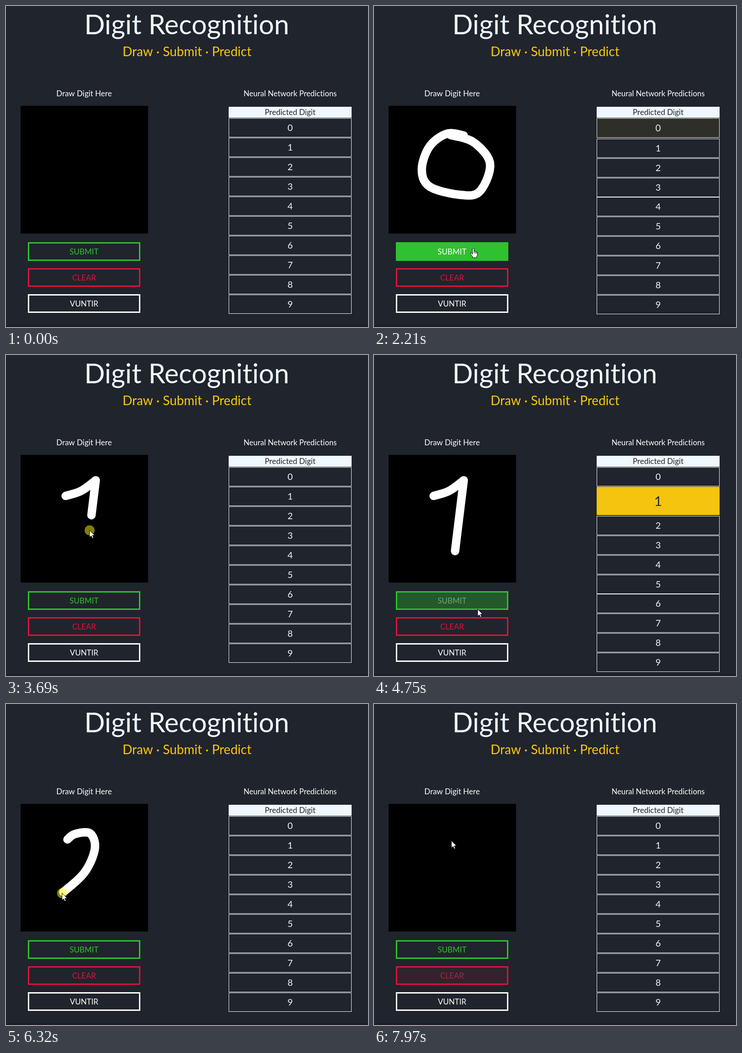
An HTML page with a canvas for the animation above (8000 ms loop, 795x704 px).

```html
<!DOCTYPE html>
<html lang="en">
<head>
<meta charset="utf-8">
<title>Digit Recognition</title>
<style>
html, body { margin: 0; width: 100%; height: 100%; overflow: hidden; background: #20242c; }
canvas { display: block; width: 795px; height: 704px; }
</style>
</head>
<body>
<canvas id="stage" width="795" height="704"></canvas>
<script>
const ctx = document.getElementById('stage').getContext('2d');
const LOOP = 8000;
const BG = [32, 36, 44], WHITE = [255, 255, 255], ICE = [240, 248, 255];
const GOLD = [250, 200, 15], GREEN = [47, 193, 47], RED = [220, 20, 60];

const clamp = v => Math.max(0, Math.min(1, v));
const smooth = v => { v = clamp(v); return v * v * (3 - 2 * v); };
const lerp = (a, b, k) => a + (b - a) * k;
const mix = (a, b, k) => a.map((v, i) => lerp(v, b[i], k));
const rgb = (c, a = 1) => `rgba(${c.map(Math.round).join()},${a})`;

const ENTER = 340, TAP = 60;
const SUBMIT_SPOT = [218, 531];

// One round per digit: pen strokes, then a tap on SUBMIT and one on CLEAR.
const rounds = [
  {
    pen: [{ from: 900, to: 1560, pts: [[197, 284], [160, 280], [122, 308], [105, 358], [122, 396],
      [188, 414], [232, 407], [255, 346], [219, 299], [168, 283]] }],
    submit: 2120, clear: 2850, clearSpot: [224, 602]
  },
  {
    pen: [
      { from: 3470, to: 3576, pts: [[131, 309], [165, 298], [197, 275]] },
      { from: 3576, to: 3748, pts: [[197, 275], [178, 430]] }
    ],
    submit: 4510, clear: 5320, clearSpot: [238, 586]
  },
  {
    pen: [
      { from: 5800, to: 6300, pts: [[135, 297], [152, 285], [185, 284], [195, 318], [172, 370], [123, 415]] },
      { from: 6390, to: 6570, pts: [[123, 415], [214, 414]] }
    ],
    submit: 6960, clear: 7710, clearSpot: [238, 588]
  }
];

// Smooth curve through the points, equal time for each span.
function curve(pts, k) {
  const n = pts.length - 1;
  const i = Math.min(n - 1, Math.floor(clamp(k) * n));
  const u = clamp(k) * n - i;
  const at = j => pts[Math.max(0, Math.min(n, j))];
  return [0, 1].map(d => {
    const [a, b, c, e] = [-1, 0, 1, 2].map(j => at(i + j)[d]);
    return b + u / 2 * (c - a + u * (2 * a - 5 * b + 4 * c - e + u * (3 * (b - c) + e - a)));
  });
}

// Pointer track: travel to the digit, draw, travel to each button in turn.
const track = [];
const travel = (from, to, goal) => track.push({ from, to, goal });
let free = ENTER;
for (const r of rounds) {
  travel(free, r.pen[0].from, r.pen[0].pts[0]);
  track.push(...r.pen);
  const done = r.pen[r.pen.length - 1].to;
  travel(done, lerp(done, r.submit, 0.8), SUBMIT_SPOT);
  travel(r.submit + 90, r.submit + 400, r.clearSpot);
  free = r.clear + 70;
}
travel(free, LOOP - 30, [170, 300]);

function pointerAt(t) {
  let p = [601, 678];
  for (const s of track) {
    if (t < s.from) break;
    const k = (t - s.from) / (s.to - s.from);
    p = s.pts ? curve(s.pts, k) : mix(p, s.goal, smooth(k));
  }
  return p;
}

const pressed = t => rounds.some(r =>
  (t >= r.pen[0].from && t < r.pen[r.pen.length - 1].to + 20) ||
  [r.submit, r.clear].some(tap => t >= tap && t < tap + TAP));

const buttons = [
  { label: 'SUBMIT', color: GREEN, hover: rounds.map(r => [r.submit - 150, r.submit + 150]) },
  { label: 'CLEAR', color: RED, hover: rounds.map(r => [r.clear - 460, r.clear + 98]) },
  { label: 'VUNTIR', color: WHITE, hover: [] }
];
const hovered = (b, t) => b.hover.some(([on, off]) => t >= on && t < off);

function text(str, x, y, size, color) {
  ctx.font = `${size}px Lato, "Open Sans", sans-serif`;
  ctx.fillStyle = color;
  ctx.fillText(str, x, y);
}

function box(x, y, w, h, color) {
  ctx.fillStyle = color;
  ctx.fillRect(x, y, w, h);
}

function frame(x, y, w, h, line, color) {
  ctx.lineWidth = line;
  ctx.strokeStyle = color;
  ctx.strokeRect(x + line / 2, y + line / 2, w - line, h - line);
}

function drawPad(t) {
  box(32, 219, 280, 280, '#000');
  ctx.lineWidth = 18.5;
  ctx.lineCap = ctx.lineJoin = 'round';
  ctx.strokeStyle = '#fff';
  const ink = t - 30;
  for (const r of rounds) {
    if (t >= r.clear + TAP) continue;
    for (const s of r.pen) {
      if (ink <= s.from) continue;
      const end = clamp((ink - s.from) / (s.to - s.from));
      ctx.beginPath();
      for (let i = 0; i <= 60; i++) ctx.lineTo(...curve(s.pts, end * i / 60));
      ctx.stroke();
    }
  }
  ctx.lineJoin = 'miter';
}

function drawTable(t) {
  box(489, 221, 270, 24, rgb(ICE));
  text('Predicted Digit', 624, 239, 17, rgb(BG));
  let shift = 0;
  for (let i = 0; i < 10; i++) {
    const r = rounds[i];
    const k = r ? smooth((t - r.submit - TAP) / 200) - smooth((t - r.clear - TAP) / 200) : 0;
    const y = Math.round(246.3 + 42.95 * i + shift);
    const h = Math.round(42 + 21 * k);
    if (k > 0) box(489, y, 270, h, rgb(GOLD, k));
    frame(489, y, 270, h, 1, rgb(mix(ICE, GOLD, clamp(k * 2))));
    const size = 20 + 10 * k;
    text(i, 624, y + h / 2 + size * 0.36, size, rgb(mix(ICE, BG, k)));
    shift += 21 * k;
  }
}

function drawButton(b, i, t) {
  const y = 518 + 57 * i;
  let fill = 0, tint = 1;
  for (const [on, off] of b.hover) {
    if (t >= on && t < off) {
      fill = smooth((t - on) / 120);
      tint = 1 - fill;
    } else if (t >= off && t < off + 300) {
      tint = (t - off) / 300;
      fill = (1 - tint) ** 3;
    }
  }
  box(48, y, 247, 41, rgb(b.color, fill));
  frame(48, y, 247, 41, 3, rgb(b.color));
  text(b.label, 171.5, y + 26.5, 17, rgb(b.color, tint));
  text(b.label, 171.5, y + 26.5, 17, rgb(WHITE, fill));
}

const ARROW = new Path2D('M0 0V15.5L3.6 12.2 6 17.8 8.6 16.7 6.2 11.2H11Z');
const HAND = new Path2D('M-1.8 1.5Q0 -1 1.8 1.5V7Q3.5 5.8 4.7 7.6 6.2 6.7 7.3 8.5 9 8 9.2 10V14' +
  'Q9 17 7.3 18.5V21H-1.7V18.6L-6.2 12.6Q-6.3 10 -4 10.8L-1.8 13Z');
const FINGERS = new Path2D('M1.8 7V11M4.7 8V11.5M7.3 9V12');

function drawPointer(t) {
  if (t < ENTER) return;
  const [x, y] = pointerAt(t);
  if (pressed(t)) {
    ctx.fillStyle = 'rgba(255,255,0,.5)';
    ctx.beginPath();
    ctx.arc(x, y, 11, 0, Math.PI * 2);
    ctx.fill();
  }
  const hand = buttons.some(b => hovered(b, t));
  const shape = hand ? HAND : ARROW;
  ctx.save();
  ctx.translate(x, y);
  ctx.lineWidth = 1;
  ctx.strokeStyle = '#000';
  ctx.fillStyle = '#fff';
  ctx.fill(shape);
  ctx.stroke(shape);
  if (hand) ctx.stroke(FINGERS);
  ctx.restore();
}

function draw(t) {
  ctx.textAlign = 'center';
  ctx.letterSpacing = '0.01px'; // keeps ligatures off
  box(0, 0, 795, 704, rgb(BG));
  box(0, 700, 795, 4, '#1e1c28');
  text('Digit Recognition', 397, 62, 59.5, rgb(ICE));
  text('Draw · Submit · Predict', 397.5, 110, 28, rgb(GOLD));
  text('Draw Digit Here', 171.5, 197.5, 17, rgb(WHITE));
  text('Neural Network Predictions', 624, 197.5, 16.8, rgb(WHITE));
  drawPad(t);
  drawTable(t);
  buttons.forEach((b, i) => drawButton(b, i, t));
  drawPointer(t);
}

const start = performance.now();
function tick() {
  draw((performance.now() - start) % LOOP);
  requestAnimationFrame(tick);
}
tick();
</script>
</body>
</html>
```
